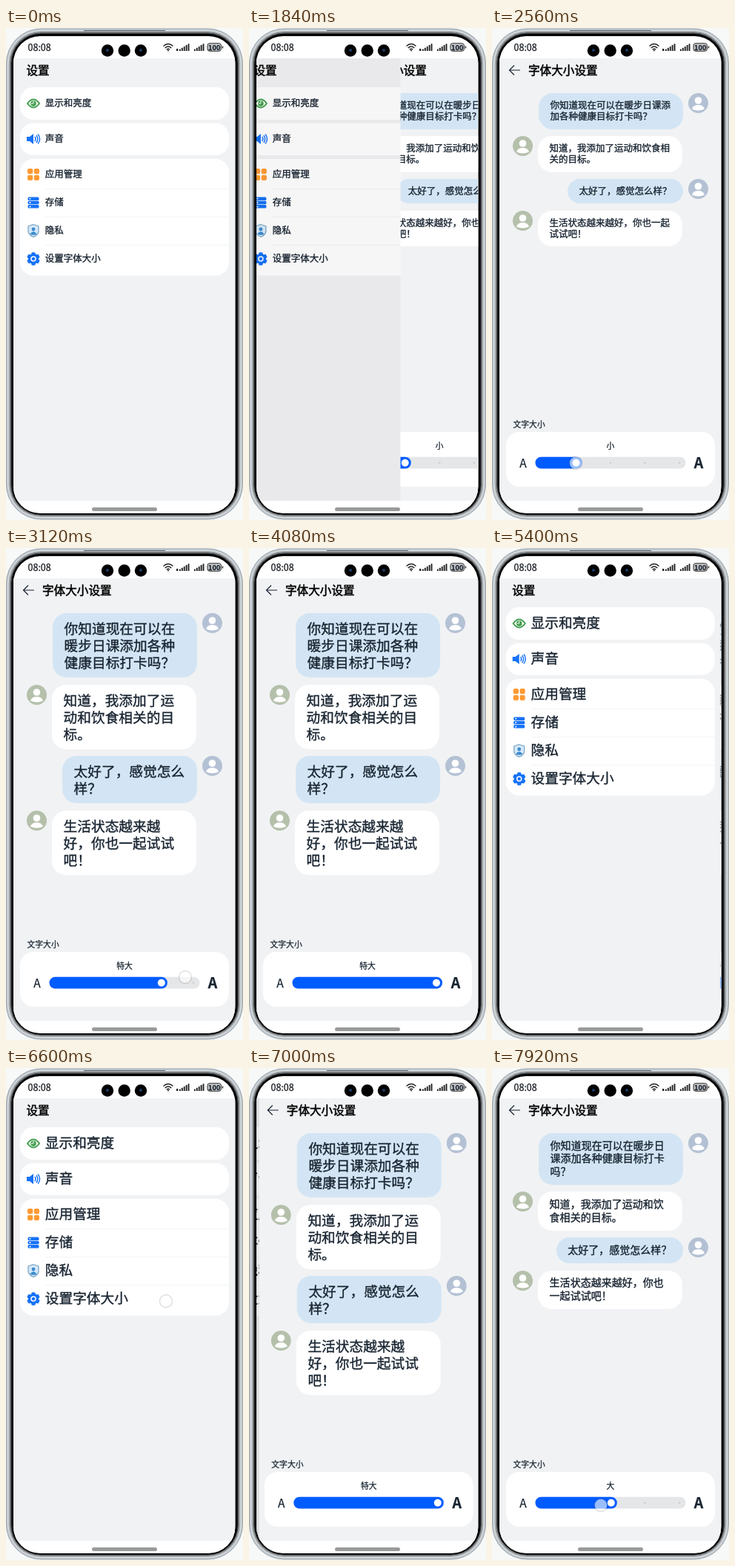
These frames come from a looping animation (320x665 px, 8000 ms). An HTML page:

```html
<!DOCTYPE html>
<html lang="zh-CN">
<head>
<meta charset="utf-8">
<title>字体大小设置</title>
<style>
  html, body { margin: 0; width: 100%; height: 100%; overflow: hidden; background: #f7f8f8; }
  #stage { position: relative; width: 320px; height: 665px; overflow: hidden;
    font-family: "Noto Sans CJK SC", "Noto Sans CJK", "Noto Sans", sans-serif;
    color: #182431; text-spacing-trim: space-all; }
  #stage svg, .layer { position: absolute; left: 0; top: 0; width: 320px; height: 665px; }
  #screen { clip-path: inset(11px 10.5px 9px 10px round 36px); background: #fff; }
  #view { clip-path: inset(41px 10.5px 26px 10px); }
  #list, #page { background: #f1f2f4; }
  #dim { background: #000; }
  /* A hairline outline gives the medium weight */
  text { fill: #182431; stroke: #182431; stroke-width: .25px; }
  .item, .bubble { font-size: var(--size); }
  .item { stroke-width: .35px; }
  .title { font-size: 15.6px; fill: #000; stroke: #000; stroke-width: .55px; }
  #chat { position: absolute; left: 28px; top: 88px; width: 264px; }
  .row { display: flex; align-items: flex-start; gap: 7px; margin-bottom: 9.4px; }
  .row.me { flex-direction: row-reverse; }
  #stage .avatar { position: static; flex: none; width: 27px; height: 27px; }
  .bubble { box-sizing: border-box; max-width: 195px; padding: 7.9px 15.6px 9.8px;
    line-height: 1.24; border-radius: 19px; background: #fff; -webkit-text-stroke: .35px #182431; }
  .me .bubble { background: #d3e5f4; }
</style>
</head>
<body>
<div id="stage">
  <svg id="frame">
    <rect x=".5" y="1" width="319" height="663" rx="47" fill="#c3cbd1" stroke="#9aa3a9"/>
    <rect x="3" y="3.5" width="314" height="658" rx="44.5" fill="#a9adb0" stroke="#dfe4e7"/>
    <rect x="5.5" y="5.8" width="309" height="653.4" rx="42" fill="#505356" stroke="#85898c"/>
    <rect x="7.3" y="7.8" width="305.4" height="650" rx="40" fill="#000"/>
    <path d="M105 3.5H215" stroke="#5f666c"/>
  </svg>

  <div id="screen" class="layer">
    <div id="view" class="layer">
      <div id="list" class="layer"><svg id="listArt"></svg></div>
      <div id="dim" class="layer"></div>
      <div id="cover" class="layer">
        <div id="page" class="layer">
          <div id="chat"></div>
          <svg>
            <path d="M38 57H24M30 50.5L23.5 57L30 63.5" fill="none" stroke="#182431" stroke-width="1.2"/>
            <text class="title" x="49" y="62.5">字体大小设置</text>
            <text x="28.5" y="540.3" font-size="10.8">文字大小</text>
            <rect x="19" y="546" width="282" height="74" rx="18" fill="#fff"/>
            <text id="label" x="160" y="568.8" font-size="10.8" text-anchor="middle"></text>
            <text x="42" y="593.5" font-size="15.5" text-anchor="middle">A</text>
            <text x="279" y="594.7" font-size="19.5" font-weight="700" text-anchor="middle">A</text>
            <rect x="58.5" y="579.8" width="203" height="15.7" rx="7.85" fill="#e5e6e8"/>
            <g id="ticks" fill="#cdced0"></g>
            <rect id="fill" x="58.5" y="579.8" height="15.7" rx="7.85" fill="#005cff"/>
            <circle id="knob" cy="587.7" r="5" fill="#fff"/>
          </svg>
        </div>
      </div>
    </div>
  </div>

  <svg id="status">
    <text x="29.5" y="30.8" font-size="12.5" style="fill:#111">08:08</text>
    <g fill="#000"><circle cx="137" cy="30.5" r="8.2"/><circle cx="159.7" cy="30.5" r="8.2"/><circle cx="182" cy="30.5" r="8.2"/></g>
    <g fill="#1d3a6b"><circle cx="137" cy="30" r="2"/><circle cx="182" cy="30" r="2"/></g>
    <path d="M212.5 24.5Q219 18.5 225.5 24.5M214.7 27Q219 23 223.3 27M216.8 29.3Q219 27.3 221.2 29.3"
      fill="none" stroke="#222" stroke-width="1.4"/>
    <circle cx="219" cy="30.6" r="1" fill="#222"/>
    <g id="bars" fill="#222"></g>
    <rect x="272" y="20.7" width="18.5" height="10.6" rx="3" fill="#c4c4c4" stroke="#333"/>
    <path d="M292.5 24.5V27.5" stroke="#333" stroke-width="1.5"/>
    <text x="281.3" y="29.5" font-size="9.3" font-weight="700" text-anchor="middle">100</text>
    <rect x="116" y="648" width="88" height="5" rx="2.5" fill="#999a9b"/>
    <circle id="touch" r="8.5" fill="#fff" fill-opacity=".6" stroke="#000" stroke-opacity=".13" stroke-width="1.4"/>
  </svg>
</div>

<script>
const LOOP = 8000;
const $ = id => document.getElementById(id);
const rect = (x, y, w, h, rx, fill) =>
  `<rect x="${x}" y="${y}" width="${w}" height="${h}" rx="${rx}" fill="${fill}"/>`;
const range = n => [...Array(n).keys()];

// Icons are drawn around (0, 0)
const BLUE = '#1672f6';
const icons = {
  eye: `<path d="M-8 0Q0 -11 8 0Q0 11 -8 0Z" fill="#fff" stroke="#45a050" stroke-width="2"/>
    <circle r="3.8" fill="#45a050"/><path d="M0 -3.5V0H-3" stroke="#fff" fill="none"/>`,
  sound: `<path d="M-9 -3H-5L0 -7V7L-5 3H-9Z" fill="${BLUE}"/>
    <path d="M2 -3Q4 0 2 3M4 -5Q7.5 0 4 5M6.2 -6.5Q11 0 6.2 6.5" fill="none" stroke="${BLUE}" stroke-width="1.4"/>`,
  apps: range(4).map(i => rect(i % 2 ? .8 : -8, i > 1 ? .8 : -8, 7.2, 7.2, 2.2, '#ff9a33')).join(''),
  storage: range(3).map(i => rect(-7.5, -7.5 + i * 5.3, 15, 4.5, 1.5, BLUE) +
    `<circle cx="-4.5" cy="${-5.2 + i * 5.3}" r="1" fill="#fff"/>`).join(''),
  shield: `<path d="M0 -8.5L7 -6V1Q6 6 0 8.5Q-6 6 -7 1V-6Z" fill="#d5e8f7" stroke="#7fa9c9" stroke-width="1.3"/>
    <circle cy="-2" r="2.4" fill="#3a8ad0"/><path d="M-4.5 4.5Q0 -2 4.5 4.5Q0 7 -4.5 4.5Z" fill="#3a8ad0"/>`,
  gear: `<g fill="${BLUE}"><circle r="7"/>${range(6).map(i =>
    `<rect x="-2.7" y="-8.8" width="5.4" height="5" rx="1.5" transform="rotate(${i * 60})"/>`).join('')}</g>
    <circle r="3" fill="${BLUE}" stroke="#fff" stroke-width="1.5"/>`
};
const items = [
  ['eye', 102, '显示和亮度'], ['sound', 150, '声音'], ['apps', 198, '应用管理'],
  ['storage', 236, '存储'], ['shield', 274, '隐私'], ['gear', 312, '设置字体大小']
];

$('listArt').innerHTML =
  '<text class="title" x="27.5" y="62.5">设置</text>' +
  [[80, 44], [128.5, 43.5], [177, 157.5]].map(([y, h]) => rect(19, y, 282, h, 18, '#fff')).join('') +
  [217, 255, 293].map(y => rect(53, y, 248, 1, 0, '#f3f4f5')).join('') +
  items.map(([icon, y, name]) =>
    `<g transform="translate(37 ${y})">${icons[icon]}</g><text class="item" x="52.8" data-y="${y}">${name}</text>`).join('');
const itemTexts = document.querySelectorAll('.item');

const messages = [
  ['me', '你知道现在可以在暖步日课添加各种健康目标打卡吗？'],
  ['', '知道，我添加了运动和饮食相关的目标。'],
  ['me', '太好了，感觉怎么样？'],
  ['', '生活状态越来越好，你也一起试试吧！']
];
$('chat').innerHTML = messages.map(([who, words]) => `<div class="row ${who}">
  <svg class="avatar" viewBox="-13.5 -13.5 27 27"><circle r="13.5" fill="${who ? '#b4c1d4' : '#b5c0ab'}"/>
  <circle cy="-3.5" r="4.8" fill="#fff"/><path d="M-8.5 8Q-7 2.5 0 2.5Q7 2.5 8.5 8Q0 12 -8.5 8Z" fill="#fff"/></svg>
  <div class="bubble">${words}</div></div>`).join('');
const reply = document.querySelectorAll('.bubble')[2];

const tickX = level => 67 + 46.5 * level;
$('ticks').innerHTML = range(5).map(i => `<circle cx="${tickX(i)}" cy="587.7" r="1.3"/>`).join('');
$('bars').innerHTML = [234, 254].map(x => range(5).map(i =>
  rect(x + i * 2.9, 28.5 - i * 1.8, 1.9, 2.5 + i * 1.8, .5, '#222')).join('')).join('') +
  rect(230, 28, 2.4, 3, .5, '#222');

const labels = ['小', '小', '大', '超大', '特大'];
const sizes = [10.9, 12.5, 14.03, 15.6, 18.7];
const levelChanges = [[0, 1], [2712, 2], [3002, 3], [3117, 4], [7647, 3], [7867, 2]];
const KNOB_TIME = 55;

// Each gesture is a list of [time, x, y]
const gestures = [
  [[1640, 216, 315], [1760, 216, 315]],
  [[2560, 113, 588], [3110, 200, 582], [3120, 242, 580], [3320, 242, 580], [3560, 288, 566]],
  [[4960, 30, 57], [5040, 30, 57]],
  [[6600, 216, 315], [6720, 216, 315]],
  [[7520, 253, 588], [7860, 190, 590], [7920, 147, 591], [8000, 147, 591]]
];

const clamp = v => Math.max(0, Math.min(1, v));
const mix = (a, b, k) => a + (b - a) * k;

// Critically damped spring, time in ms
function spring(ms) {
  const z = Math.max(0, ms) * .0185;
  return 1 - (1 + z) * Math.exp(-z);
}

function drawNavigation(t) {
  const shown = spring(t - 1774) - spring(t - 4997) + spring(t - 6654);
  const edge = 300 * (1 - shown);
  $('list').style.transform = `translateX(${-60 * shown}px)`;
  $('dim').style.opacity = .1 * shown;
  $('cover').style.clipPath = `inset(0 0 0 ${10 + edge}px)`;
  $('page').style.transform = `translateX(${edge / 2}px)`;
}

function drawSize(t) {
  const i = levelChanges.findLastIndex(([start]) => start <= t);
  const [start, level] = levelChanges[i];
  const previous = i ? levelChanges[i - 1][1] : level;
  const k = clamp((t - start) / KNOB_TIME);
  const x = mix(tickX(previous), tickX(level), k);
  $('knob').setAttribute('cx', x);
  $('fill').setAttribute('width', x + 8 - 58.5);
  $('label').textContent = labels[level];
  $('stage').style.setProperty('--size', sizes[level] + 'px');
  for (const el of itemTexts) el.setAttribute('y', +el.dataset.y + sizes[level] * .34);
  // The reply bubble widens only once the knob has settled
  reply.style.maxWidth = level === 4 && k < 1 ? '182px' : '';
}

function drawTouch(t) {
  const path = gestures.find(g => t >= g[0][0] && t < g.at(-1)[0]);
  $('touch').style.display = path ? '' : 'none';
  if (!path) return;
  const i = path.findIndex(([time]) => time > t);
  const [t0, x0, y0] = path[i - 1], [t1, x1, y1] = path[i];
  const k = (t - t0) / (t1 - t0);
  $('touch').setAttribute('cx', mix(x0, x1, k));
  $('touch').setAttribute('cy', mix(y0, y1, k));
}

function draw() {
  const t = performance.now() % LOOP;
  drawNavigation(t);
  drawSize(t);
  drawTouch(t);
  requestAnimationFrame(draw);
}
draw();
</script>
</body>
</html>
```
